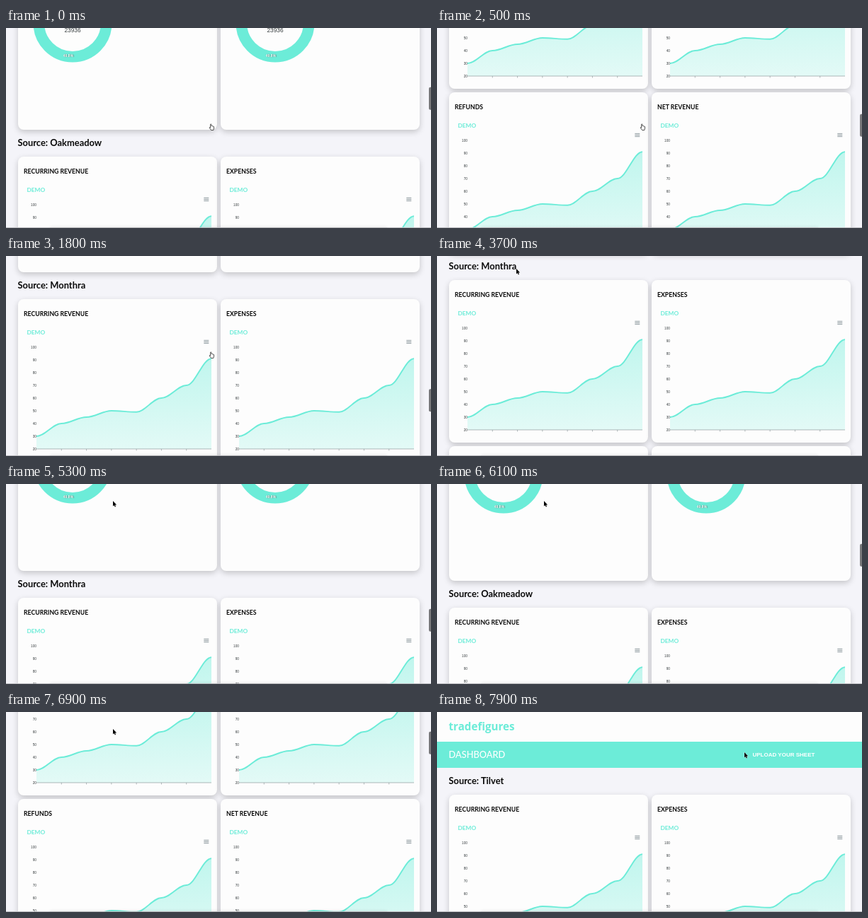
These frames come from a looping animation (600x283 px, 8000 ms). An HTML page:

```html
<!DOCTYPE html>
<html lang="en">
<head>
<meta charset="utf-8">
<title>Dashboard</title>
<style>
  html, body { margin: 0; width: 100%; height: 100%; overflow: hidden; background: #f4f4f9; }
  #stage { position: relative; width: 600px; height: 283px; overflow: hidden; }
  #page { position: absolute; left: 0; top: 0; width: 600px; height: 2445px; }
  #page > div, #thumb, #edge, .cursor { position: absolute; }
  .top { width: 600px; height: 41.5px; background: #fdfdfd; }
  .bar { top: 41.5px; width: 600px; height: 37.5px; background: #6cecd8; }
  .card { width: 281px; border-radius: 8px; background: #fdfdfd; box-shadow: 0 3px 9px rgba(0, 0, 0, .2); }
  svg { display: block; overflow: visible; }
  #head { position: absolute; left: 0; top: 0; }
  text { font-family: Lato, "Open Sans", sans-serif; font-weight: 700; }
  .brand { font: 700 15.2px "Open Sans", "Noto Sans", sans-serif; fill: #6cecd8; }
  .dash { font-size: 12.8px; font-weight: 500; fill: #fff; }
  .upload { font: 700 8px "Liberation Sans", Arial, sans-serif; fill: #fff; }
  .source { font-size: 12.9px; fill: #0a0a0a; }
  .title { font-size: 8.7px; fill: #0a0a0a; }
  .demo { font-size: 8.4px; fill: #6cecd8; }
  .num { font: 400 4.8px "Liberation Sans", Arial, sans-serif; fill: #373d3f; text-anchor: end; }
  .total { font: 400 8.3px "Liberation Sans", Arial, sans-serif; fill: #373d3f; text-anchor: middle; }
  .share { font: 700 5.2px "Liberation Sans", Arial, sans-serif; fill: #fff; text-anchor: middle;
    text-shadow: .5px .5px 1px rgba(0, 0, 0, .6); }
  .line { fill: none; stroke: #6cecd8; stroke-width: 1.9; }
  .axis { fill: none; stroke: #8f9a9c; stroke-width: .7; }
  .menu { fill: none; stroke: #8b979c; stroke-width: 1; }
  #thumb { left: 597px; top: 0; width: 5px; height: 32px; border-radius: 2px; background: #77777a; }
  #edge { left: 0; top: 282px; width: 600px; height: 1px; background: #bcbcc0; }
  #edge::after { content: ""; position: absolute; left: 62px; top: 0; width: 476px; height: 1px;
    background: #b4b4b8; box-shadow: 0 0 4px rgba(0, 0, 0, .22); }
  .cursor { left: 0; top: 0; }
</style>
</head>
<body>
<div id="stage">
  <div id="page"></div>
  <div id="thumb"></div>
  <div id="edge"></div>
  <svg class="cursor" id="arrow" width="8" height="11">
    <path d="M0 0V7.4L1.7 5.9L2.8 8.5L4 8L2.9 5.5H5.2Z" fill="#000" stroke="#fff" stroke-width=".7" paint-order="stroke"/>
  </svg>
  <svg class="cursor" id="hand" width="8" height="11">
    <path d="M1.6 .8Q2.4 .1 3 1V3Q3.8 2.6 4.2 3.3Q5 2.9 5.4 3.6Q6.5 3.4 6.5 4.6V6.6L5.8 9H2.6L.4 6Q-.2 5 1 5L1.7 5.6Z"
      fill="#fff" stroke="#222" stroke-width=".8" stroke-linejoin="round"/>
  </svg>
</div>
<script>
const $ = id => document.getElementById(id);
const TEAL = '#6cecd8', LEFT = [17, 303];
const FIRST = 117, SECTION = 776, ROW = 235, CARD = 230, PIE = 268;
const X0 = 26, STEP = 247 / 7, BASE = 212;
const data = [30, 40, 45, 50, 49, 60, 70, 91];

const text = (cls, x, y, s) => `<text class="${cls}" x="${x}" y="${y}">${s}</text>`;
const px = i => X0 + i * STEP;
const py = v => BASE - (v - 20) * 1.8;

function curve() {
  const c = STEP * .35;
  return data.map((v, i) => i
    ? `C${px(i - 1) + c} ${py(data[i - 1])} ${px(i) - c} ${py(v)} ${px(i)} ${py(v)}`
    : `M${px(0)} ${py(v)}`).join('');
}

function chart(title) {
  const d = curve();
  let s = text('title', 8, 24, title) + text('demo', 12.4, 50, 'DEMO');
  s += `<path d="${d}V${BASE}H${X0}Z" fill="url(#fade)"/>`;
  let axis = `M${X0} ${BASE}H${px(7)}`;
  for (let i = 1; i < 7; i++) axis += `M${px(i)} ${BASE}v2.5`;
  s += `<path class="axis" d="${axis}"/><path class="line" d="${d}"/>`;
  for (let v = 20; v <= 100; v += 10) s += text('num', X0, py(v) + 1.5, v);
  return s + '<path class="menu" d="M262.3 58.4h7M262.3 60.5h7M262.3 62.6h7"/>';
}

function pie() {
  return text('demo', 12.4, 50, 'DEMO')
    + `<circle cx="77" cy="117" r="47.7" fill="none" stroke="${TEAL}" stroke-width="15.6"/>`
    + text('total', 77, 130, '23936') + text('share', 71, 164.5, '49.8%');
}

const card = (col, y, h, body) =>
  `<div class="card" style="left:${LEFT[col]}px;top:${y}px;height:${h}px"><svg width="281" height="${h}">${body}</svg></div>`;

function build() {
  let cards = '';
  let head = `<defs><linearGradient id="fade" x2="0" y2="1"><stop stop-color="${TEAL}" stop-opacity=".42"/>`
    + `<stop offset="1" stop-color="${TEAL}" stop-opacity=".18"/></linearGradient></defs>`
    + text('brand', 16.5, 25.5, 'tradefigures') + text('dash', 16.5, 64.5, 'DASHBOARD')
    + text('upload', 445.5, 63.4, 'UPLOAD YOUR SHEET');
  ['Tilvet', 'Oakmeadow', 'Monthra'].forEach((name, i) => {
    const y = FIRST + i * SECTION;
    head += text('source', 16.5, y - 14.7, 'Source: ' + name);
    [['RECURRING REVENUE', 'EXPENSES'], ['REFUNDS', 'NET REVENUE']].forEach((row, r) =>
      row.forEach((title, col) => cards += card(col, y + r * ROW, CARD, chart(title))));
    for (const col of [0, 1]) cards += card(col, y + 2 * ROW, PIE, pie());
  });
  $('page').innerHTML = '<div class="top"></div><div class="bar"></div>' + cards
    + `<svg id="head" width="600" height="2445">${head}</svg>`;
}

// Monotone cubic through [time, value] keys
function track(keys) {
  const slope = i => (keys[i + 1][1] - keys[i][1]) / (keys[i + 1][0] - keys[i][0]);
  const tangent = keys.map((k, i) => {
    if (!i || i === keys.length - 1) return 0;
    const a = slope(i - 1), b = slope(i);
    return a * b <= 0 ? 0 : 2 * a * b / (a + b);
  });
  tangent[0] = slope(0);
  return t => {
    let i = 0;
    while (i < keys.length - 2 && t >= keys[i + 1][0]) i++;
    const [t0, a] = keys[i], [t1, b] = keys[i + 1], h = t1 - t0, u = (t - t0) / h, w = 1 - u;
    return w * w * ((1 + 2 * u) * a + u * h * tangent[i]) + u * u * ((3 - 2 * u) * b - w * h * tangent[i + 1]);
  };
}

const scroll = track([[0, 711], [500, 1037], [1000, 1320], [1400, 1500], [1800, 1608], [2000, 1635],
  [5100, 1635], [5500, 1290], [6100, 718], [6900, 229], [7300, 0], [8000, 0]]);
const mouseX = track([[0, 290], [2400, 290], [3300, 114], [3700, 112], [4400, 100], [5100, 151],
  [7200, 151], [7900, 434], [8000, 434]]);
const mouseY = track([[0, 140], [2400, 140], [3300, 19], [3700, 18], [4400, 9], [5100, 24],
  [7200, 24], [7900, 57], [8000, 57]]);

const clamp = v => Math.max(0, Math.min(1, v));
function thumbAlpha(t) {
  if (t < 5200) return clamp((2800 - t) / 400);
  return clamp((7800 - t) / 300);
}

const move = (el, x, y) => el.style.transform = `translate(${x}px,${y}px)`;

function draw(now) {
  const t = Math.floor(now % 8000 / 100) * 100;
  const s = scroll(t), hand = t < 2500;
  move($('page'), 0, -Math.round(s * 2) / 2);
  move($('thumb'), 0, s * .1165 + 1);
  $('thumb').style.opacity = t >= 2800 && t < 5200 ? 0 : thumbAlpha(t);
  $('hand').style.display = hand ? 'block' : 'none';
  $('arrow').style.display = hand ? 'none' : 'block';
  if (hand) move($('hand'), mouseX(t) - 3, mouseY(t) - 4.5);
  else move($('arrow'), mouseX(t), mouseY(t));
}

build();
const start = performance.now();
function tick() {
  draw(performance.now() - start);
  requestAnimationFrame(tick);
}
tick();
</script>
</body>
</html>
```
